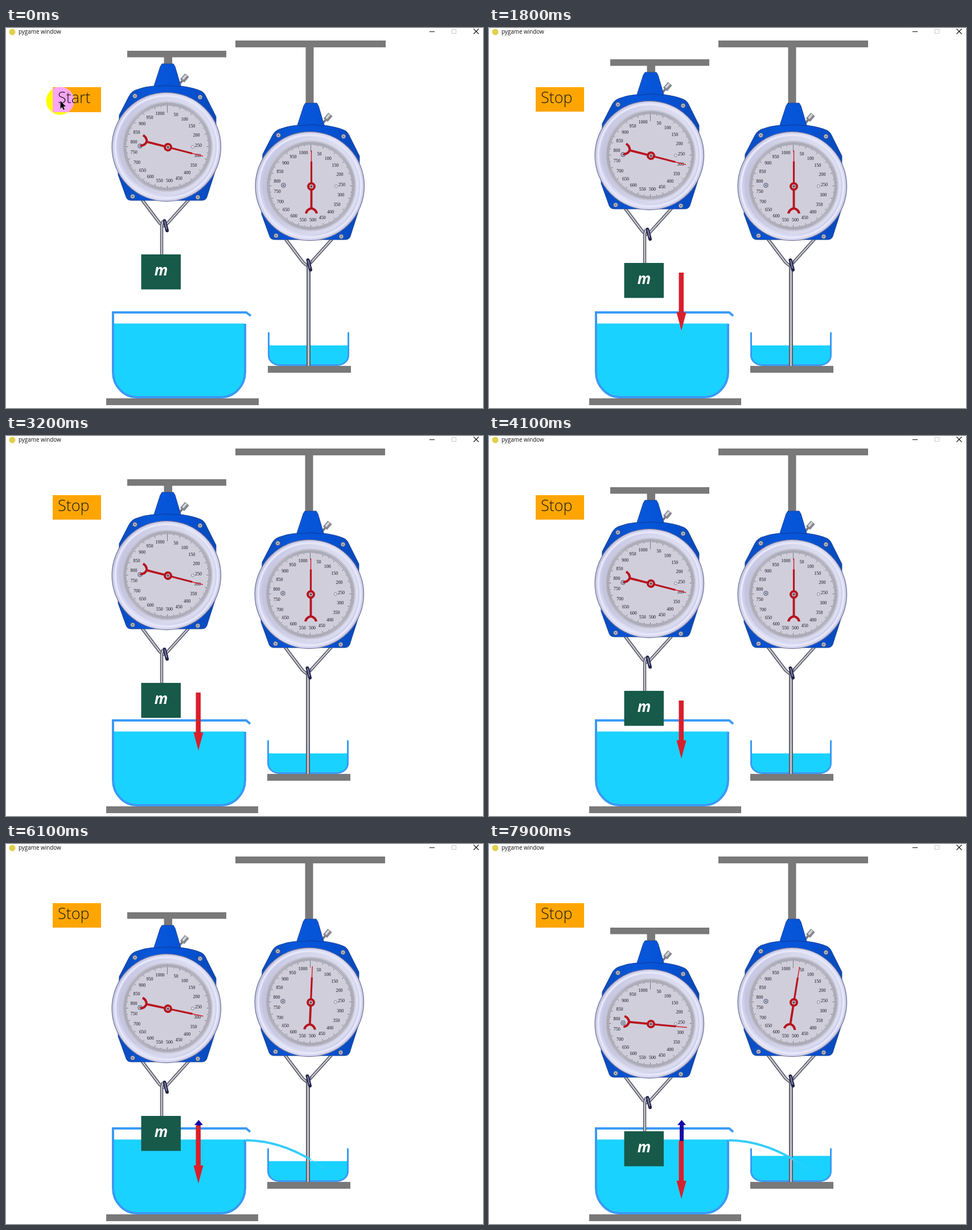
Animation, 838 px wide and 668 px high, one loop 8 s. Source, as an HTML page with a canvas:

```html
<!DOCTYPE html>
<html lang="en">
<head>
<meta charset="utf-8">
<title>Buoyancy</title>
<style>
html, body { margin: 0; width: 100%; height: 100%; overflow: hidden; background: #fff; }
canvas { display: block; width: 838px; height: 668px; }
</style>
</head>
<body>
<canvas id="stage"></canvas>
<script>
const W = 838, H = 668, LOOP = 8000, STEP = 100, CLICK = 0.8;
const GREY = '#797979', WATER = '#1ad2ff', GLASS = '#3a9af5', RED = '#d91f2c', HAND = '#b8141f';
const canvas = document.getElementById('stage');
const ratio = window.devicePixelRatio || 1;
canvas.width = W * ratio;
canvas.height = H * ratio;
const c = canvas.getContext('2d');

function box(x, y, w, h, color) {
  c.fillStyle = color;
  c.fillRect(x, y, w, h);
}

function disc(x, y, r, fill, stroke, width = 1) {
  c.beginPath();
  c.arc(x, y, r, 0, Math.PI * 2);
  if (fill) { c.fillStyle = fill; c.fill(); }
  if (stroke) { c.strokeStyle = stroke; c.lineWidth = width; c.stroke(); }
}

function trace(points) {
  c.beginPath();
  points.forEach(([x, y], i) => i ? c.lineTo(x, y) : c.moveTo(x, y));
}

function poly(points, color) {
  trace(points);
  c.closePath();
  c.fillStyle = color;
  c.fill();
}

function line(points, width, color) {
  trace(points);
  c.lineWidth = width;
  c.strokeStyle = color;
  c.stroke();
}

function text(str, x, y, font, color, align = 'left') {
  c.font = font;
  c.fillStyle = color;
  c.textAlign = align;
  c.fillText(str, x, y);
}

function blend(x0, y0, x1, y1, ...colors) {
  const g = c.createLinearGradient(x0, y0, x1, y1);
  colors.forEach((col, i) => g.addColorStop(i / (colors.length - 1), col));
  return g;
}

function wire(points, width) {
  c.lineJoin = 'round';
  line(points, width, '#505060');
  line(points, width * 0.6, '#8b8b96');
  line(points, width * 0.28, '#d6d6de');
  c.lineJoin = 'miter';
}

function screw(x, y, r = 4) {
  disc(x, y, r, '#b9bccb', '#4c5878', 1);
  disc(x, y, r * 0.4, '#74788c');
}

function housing() {
  // knob
  line([[305, 98], [312, 90]], 4, '#777986');
  line([[309.5, 93], [318, 83]], 9.5, '#85878f');
  line([[310.5, 90], [316.5, 83]], 3.5, '#d5d6dc');

  c.beginPath();
  c.moveTo(274, 63);
  c.lineTo(294, 63);
  c.lineTo(297, 68);
  c.lineTo(307, 102);
  c.quadraticCurveTo(330, 105, 343, 111);
  c.quadraticCurveTo(349, 114, 352, 122);
  c.lineTo(369, 156);
  c.lineTo(368, 250);
  c.lineTo(353, 297);
  c.quadraticCurveTo(351, 303, 344, 303);
  c.lineTo(220, 303);
  c.quadraticCurveTo(213, 303, 211, 297);
  c.lineTo(197, 258);
  c.lineTo(199, 153);
  c.lineTo(216, 120);
  c.quadraticCurveTo(220, 112, 228, 109);
  c.quadraticCurveTo(243, 103, 260, 102);
  c.lineTo(271, 68);
  c.closePath();
  c.fillStyle = blend(200, 0, 368, 0, '#0a4cc0', '#0857da', '#0552d6', '#0a49b8');
  c.fill();
  c.strokeStyle = '#1c4596';
  c.lineWidth = 1;
  c.stroke();
  line([[261, 103], [284, 101], [307, 103]], 1, '#0b3a96');
  screw(226.5, 119.5);
  screw(341, 121.5);
  screw(222.5, 296);
  screw(337, 297.5);
}

function dial() {
  disc(281.8, 209, 95.7, blend(188, 150, 376, 260, '#c4c4e4', '#dedef4', '#c9c9e8'), '#74769a', 1.3);
  disc(282, 209, 90, null, '#e6e6f8', 4);
  disc(283, 209, 85, blend(198, 0, 368, 0, '#c4c4e0', '#d8d8ec', '#dedef2'));
  disc(283.5, 208.5, 79, '#d0cedb', '#b9b8cc', 0.8);

  c.beginPath();
  for (let i = 0; i < 200; i++) {
    const a = i * Math.PI / 100, inner = i % 10 ? (i % 5 ? 72 : 70.5) : 69;
    const s = Math.sin(a), k = -Math.cos(a);
    c.moveTo(283.5 + s * 77.5, 208.5 + k * 77.5);
    c.lineTo(283.5 + s * inner, 208.5 + k * inner);
  }
  c.strokeStyle = '#55555f';
  c.lineWidth = 0.7;
  c.stroke();
  line([[283.5, 131], [283.5, 149]], 1, '#777782');

  const font = '8px "Liberation Serif", "Noto Serif", serif';
  text('1000', 270.5, 153, font, '#15151c', 'center');
  for (let i = 0; i < 19; i++) {
    const a = (17.8 + 17.35 * i) * Math.PI / 180;
    text(50 + 50 * i, 281 + 57 * Math.sin(a), 211.8 - 60 * Math.cos(a), font, '#15151c', 'center');
  }
  screw(235.5, 207.5, 3.8);
  disc(328, 209, 2.6, '#dedee8', '#8b8b9b', 1);
}

function needle(angle) {
  c.save();
  c.translate(284.5, 209.5);
  c.rotate(angle * Math.PI / 180);
  line([[0, -63.5], [0, -42]], 1.5, RED);
  line([[0, -44], [0, -6]], 3.2, HAND);
  line([[0, 6], [0, 38]], 3.8, HAND);
  c.beginPath();
  c.moveTo(-9.5, 47.5);
  c.quadraticCurveTo(-7.5, 40, 0, 38.5);
  c.quadraticCurveTo(7.5, 40, 9.5, 47.5);
  c.lineWidth = 4.2;
  c.strokeStyle = HAND;
  c.stroke();
  disc(0, 0, 5.5, '#c4bcc6', HAND, 4);
  disc(0, 0, 2, '#55505a');
  c.restore();
}

function scale(dx, dy, angle, rodX, rodEnd, rodWidth) {
  c.save();
  c.translate(dx, dy);
  wire([[239, 302], [270, 343], [276, 348], [283, 344], [321, 302]], 5.4);
  wire([[rodX, rodEnd], [rodX, 347], [rodX + 2.5, 339]], rodWidth);
  c.lineCap = 'round';
  line([[278.5, 339], [283, 356]], 6, '#24244a');
  line([[279, 340], [282, 353]], 1.8, '#8c8cb4');
  c.lineCap = 'butt';
  housing();
  dial();
  needle(angle);
  c.restore();
}

// Open vessel with rounded bottom corners
function vessel(l, r, top, topR, bottom, rx, ry, level, width) {
  const path = (yl, yr) => {
    c.beginPath();
    c.moveTo(l, yl);
    c.lineTo(l, bottom - ry);
    c.bezierCurveTo(l, bottom - ry * 0.45, l + rx * 0.45, bottom, l + rx, bottom);
    c.lineTo(r - rx, bottom);
    c.bezierCurveTo(r - rx * 0.45, bottom, r, bottom - ry * 0.45, r, bottom - ry);
    c.lineTo(r, yr);
  };
  path(level, level);
  c.fillStyle = WATER;
  c.fill();
  path(top, topR);
  c.strokeStyle = GLASS;
  c.lineWidth = width;
  c.stroke();
}

function tank(extra) {
  vessel(188, 420, 500, 520, 649, 42, 44, 519.5, 4);
  line([[186, 500], [422, 500], [429 + extra, 506]], 4, GLASS);
  box(176, 651, 267 + extra, 12, GREY);
}

function stream(t) {
  const end = Math.min(562, 421 + 450 * (t - 5.1));
  if (end <= 422) return;
  const point = x => [x, 521 + 0.0026 * (x - 421) ** 2];
  const arc = (from, to) => {
    const pts = [];
    for (let x = from; x < to; x += 3) pts.push(point(x));
    return [...pts, point(to)];
  };
  line(arc(421, Math.min(end, 535)), 4, '#35cdfa');
  if (end > 535) line(arc(535, end), 2, 'rgba(70,205,248,0.5)');
}

function button(started, t) {
  const h = started ? 43 : 44;
  box(82, 104, 85, h, '#ffa500');
  const x = pointerX(t);
  if (x !== null) {
    disc(x, 128, 24.5, '#ffff00');
    c.save();
    c.beginPath();
    c.rect(82, 104, 85, h);
    c.clip();
    disc(x, 128, 24.5, '#fba5f7');
    c.restore();
  }
  text(started ? 'Stop' : 'Start', 91, 131.5, '300 27px "Open Sans", "Noto Sans", sans-serif', '#1c1c1c');
  if (x !== null) pointer(x + 0.5, 128);
}

function pointerX(t) {
  const mix = (a, b, k) => a + (b - a) * k;
  if (t < CLICK + 0.05) return 95;
  if (t < 1.35) return mix(84, 74, (t - 0.9) / 0.4);
  if (t < 1.75) return mix(74, 36, (t - 1.3) / 0.4);
  return null;
}

function pointer(x, y) {
  c.save();
  c.translate(x, y);
  trace([[0, 0], [0, 14], [3, 11], [5.5, 16], [7.5, 15], [5.2, 10.2], [9.5, 10]]);
  c.closePath();
  c.strokeStyle = '#fff';
  c.lineWidth = 1;
  c.stroke();
  c.fillStyle = '#000';
  c.fill();
  c.restore();
}

function titleBar() {
  disc(11, 7, 5.5, '#e3cf4a');
  text('pygame window', 22, 10, '9.9px "Open Sans", "Noto Sans", sans-serif', '#111');
  box(744, 6, 9, 1, '#111');
  c.strokeStyle = '#c9c9c9';
  c.lineWidth = 1;
  c.strokeRect(783.5, 2.5, 7, 7);
  line([[821.5, 1.5], [830.5, 10.5]], 1.1, '#111');
  line([[830.5, 1.5], [821.5, 10.5]], 1.1, '#111');
}

function forces(top, lift) {
  box(333.5, top, 8.5, 72, RED);
  poly([[329.5, top + 70], [346.5, top + 70], [338, top + 102]], RED);
  if (lift <= 0) return;
  box(335, 490, 7, Math.max(0, lift - 5), '#1608a6');
  poly([[338.5, 485], [346, 494], [331, 494]], '#1608a6');
}

function draw(t) {
  const started = t >= CLICK;
  const drop = started ? Math.max(0, Math.round(15.15 * (t - 1.3) + 7.2)) : 0;
  const arrowTop = 415 + drop;
  const lift = Math.max(0, arrowTop - 485);
  const turn = 0.245 * lift;
  const rise = Math.max(0, 0.35 * (lift - 8.8));
  const extra = started ? 0 : 1;

  c.setTransform(ratio, 0, 0, ratio, 0, 0);
  box(0, 0, W, H, '#fff');
  titleBar();
  tank(extra);

  vessel(460.5 + extra, 600.5 + extra, 535, 535, 592.5, 19, 17, 558 - rise, 3);
  box(459 + extra, 594, 146, 12, GREY);

  box(403, 22, 263 + extra, 12, GREY);
  box(525.5 + extra, 34, 14, 99, GREY);
  scale(251 + extra, 69, turn, 279.5, 525, 7);
  stream(t);

  box(213, 40 + drop, 174, 11.5, GREY);
  box(277.5, 51 + drop, 14.5, 13, GREY);
  scale(0, drop, 104.4 - turn, 273.5, 399, 5.4);
  box(237.5, 398 + drop, 69.5, 61.5, '#175a4a');
  text('m', 272.5, 435 + drop, 'italic bold 26px "Open Sans", "Noto Sans", sans-serif', '#fff', 'center');

  if (started) forces(arrowTop, lift);
  button(started, t);
}

let last = -1;
function tick(now) {
  const step = Math.floor((now % LOOP) / STEP);
  if (step !== last) {
    last = step;
    draw(step * STEP / 1000);
  }
  requestAnimationFrame(tick);
}
draw(0);
requestAnimationFrame(tick);
</script>
</body>
</html>
```
